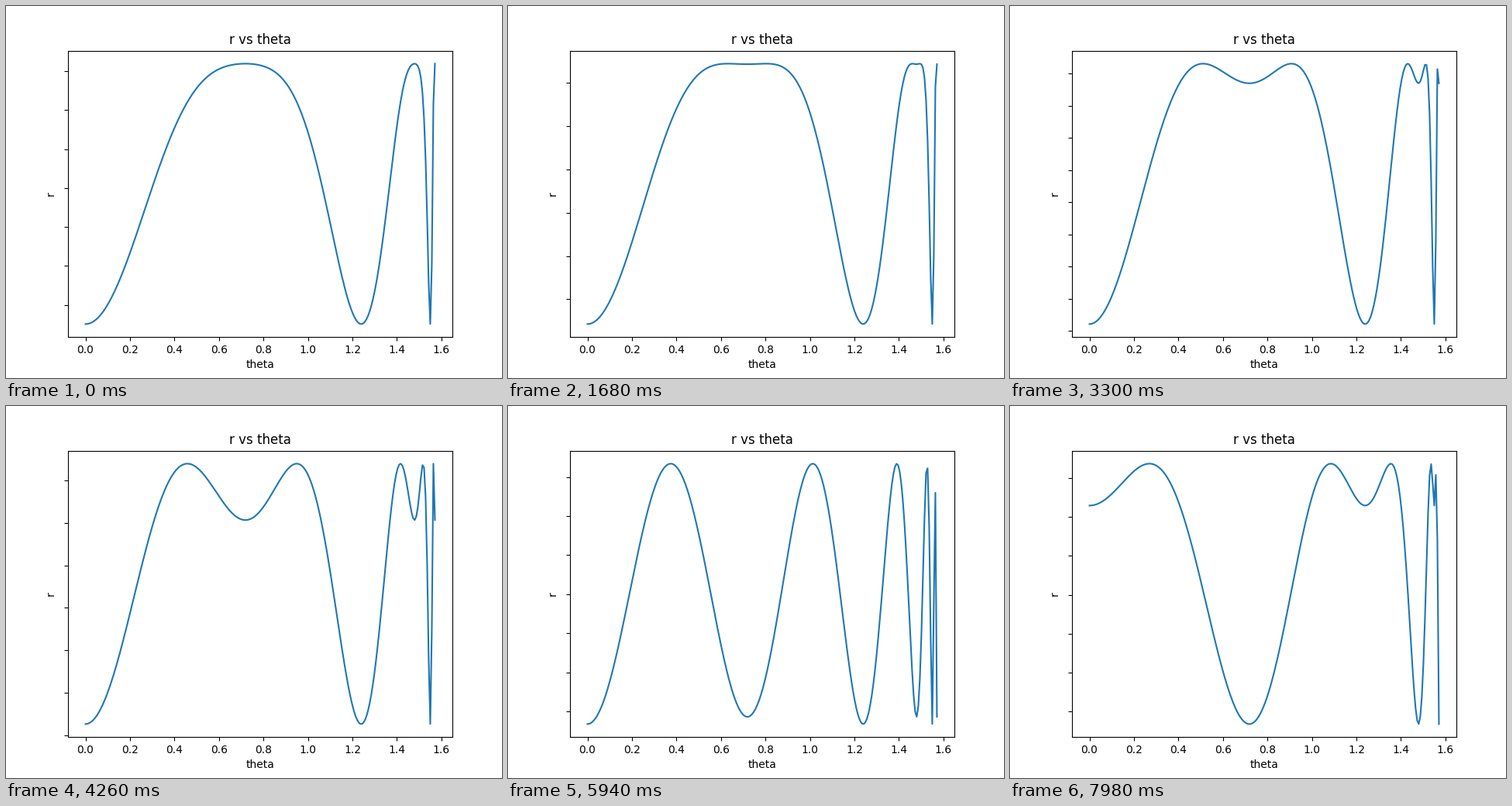
Animation of 640x480 px, one loop 8 s. Source, as a matplotlib script:

```python
import numpy as np
import matplotlib.pyplot as plt
from matplotlib.animation import FuncAnimation
from matplotlib.ticker import NullFormatter

FRAMES = 134
LOOP_MS = 8000
STEP = 0.06        # seconds of motion per drawn frame
SOFT = 0.00464     # keeps the chirp finite at a right angle

theta = np.linspace(0, np.pi / 2, 226)

# Chirp that speeds up towards pi/2, counted in half-turns
stretch = np.arcsinh(np.sin(theta) / np.hypot(np.cos(theta), SOFT))
wave = np.cos(np.pi * (0.6487 * stretch + 0.678 * theta))


def radius(t):
    peak = 0.213 * (t - 5.973)
    drop = 0.455 * (t - 4.59) ** 2
    return 3.285 * wave * (2 * peak - wave) - drop


fig, ax = plt.subplots(figsize=(6.4, 4.8), dpi=100)
line, = ax.plot(theta, radius(0))
ax.set_title("r vs theta")
ax.set_xlabel("theta")
ax.set_ylabel("r")
ax.yaxis.set_major_formatter(NullFormatter())


def update(i):
    line.set_ydata(radius(i * STEP))
    ax.relim()
    ax.autoscale_view()
    return line,


anim = FuncAnimation(fig, update, frames=FRAMES, interval=LOOP_MS / FRAMES,
                     init_func=lambda: update(0), repeat=True, repeat_delay=0)
plt.show()
```
